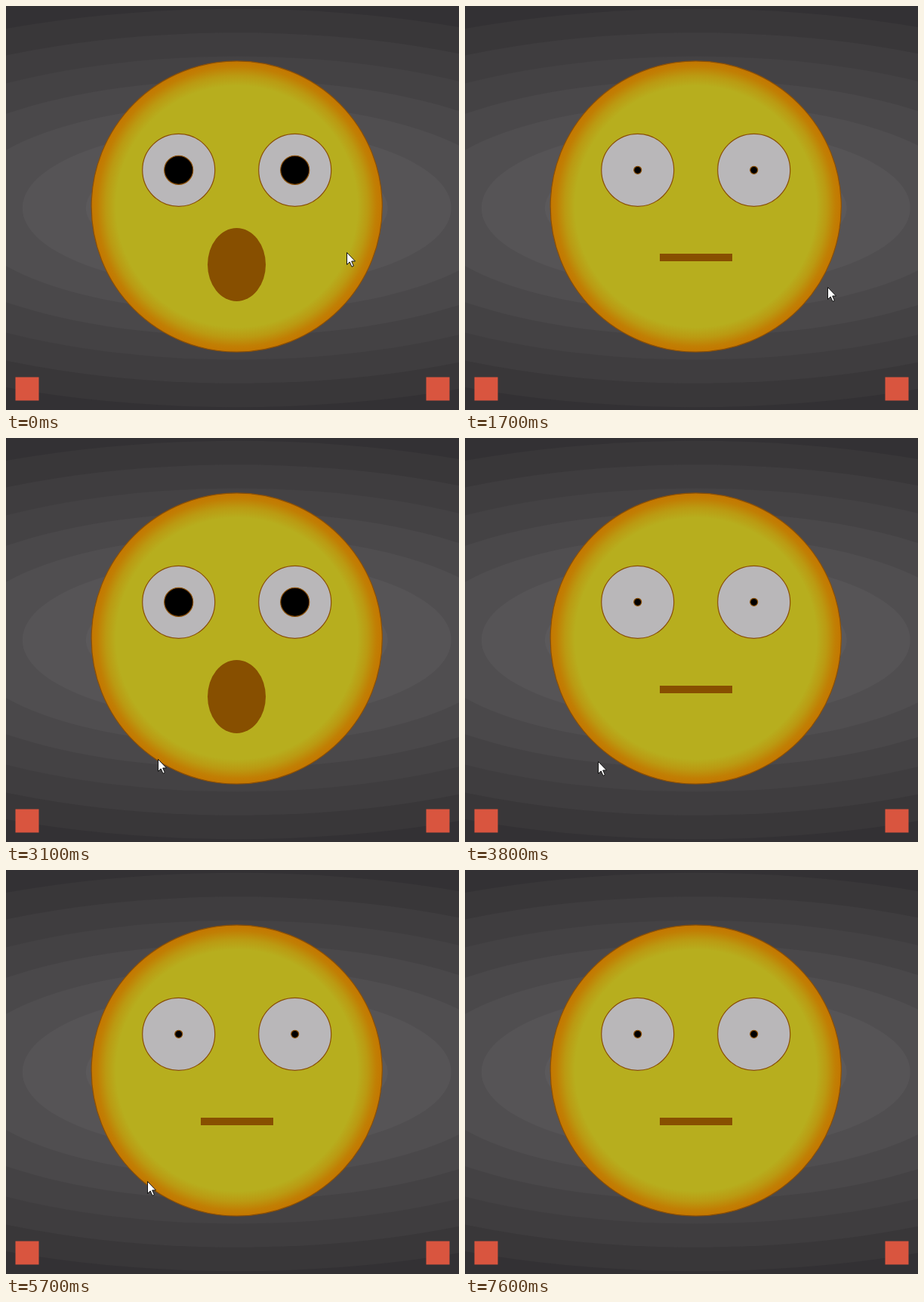
An HTML page for the animation above (8.1 s loop, 600x535 px).

```html
<!DOCTYPE html>
<html lang="en">
<head>
<meta charset="utf-8">
<title>Surprised face</title>
<style>
html, body { margin: 0; width: 100%; height: 100%; overflow: hidden; background: #333134; }
svg { display: block; width: 600px; height: 535px; }
.line { stroke: #8a4f06; stroke-width: 1.2; }
</style>
</head>
<body>
<svg viewBox="0 0 600 535">
  <defs>
    <radialGradient id="skin">
      <stop offset="0.83" stop-color="#b7ae1e"/>
      <stop offset="0.9" stop-color="#bb9a12"/>
      <stop offset="0.96" stop-color="#c17f04"/>
      <stop offset="1" stop-color="#c47600"/>
    </radialGradient>
  </defs>
  <g id="glow"></g>
  <g fill="#d9553f">
    <rect x="12.5" y="491.5" width="31" height="31"/>
    <rect x="556.5" y="491.5" width="31" height="31"/>
  </g>
  <circle class="line" cx="305.7" cy="265.5" r="192.6" fill="url(#skin)"/>
  <g id="eyes"></g>
  <rect id="mouth" fill="#874f00"/>
  <path id="cursor" d="M.5 .5V16.5L4.2 13L7 19.3L9.4 18.2L6.7 12H11.5Z" fill="#fff" stroke="#111"/>
</svg>
<script>
const $ = id => document.getElementById(id);
const LOOP = 8100, STEP = 100;
const CX = 305.7, CY = 265.5, REACH = 192;

function set(el, attrs) {
  for (const key in attrs) el.setAttribute(key, attrs[key]);
  return el;
}

function add(parent, tag, attrs) {
  const el = document.createElementNS("http://www.w3.org/2000/svg", tag);
  parent.append(set(el, attrs));
  return el;
}

// Banded grey backdrop, lightest in the middle
for (let i = 0; i < 7; i++) {
  const rx = 704 - 84 * i, v = Math.round(57 + 5.7 * i);
  add($("glow"), "ellipse", { cx: CX, cy: 267.5, rx, ry: rx / 2.67, fill: `rgb(${v},${v - 2},${v})` });
}

const pupils = [-1, 1].map(side => {
  const at = { class: "line", cx: CX + side * 77, cy: 217.3 };
  add($("eyes"), "circle", { ...at, r: 48, fill: "#b9b7b9" });
  return add($("eyes"), "circle", at);
});

// Where the pointer turns or rests: [step, x, y]
const path = [
  [0, 451, 326], [10, 503, 353], [17, 480, 372], [23, 392, 373],
  [27, 338, 401], [30, 338, 401], [31, 201, 425], [35, 160, 437],
  [38, 176, 428], [44, 242, 410], [47, 242, 410], [48, 199, 421],
  [54, 160, 428], [57, 187, 412], [63, 350, 405], [67, 448, 533], [68, 460, 560]
];

function pointer(step) {
  const i = path.findIndex(p => p[0] > step);
  if (i < 0) return path.at(-1).slice(1);
  const [s, x, y] = path[i - 1], [s2, x2, y2] = path[i];
  const k = (step - s) / (s2 - s);
  return [x + (x2 - x) * k, y + (y2 - y) * k].map(Math.round);
}

const openMouth = { x: 267, y: 294, width: 77, height: 97, rx: 38.5, ry: 48.5 };
const flatMouth = { x: 258, y: 328, width: 96, height: 10, rx: 0, ry: 0 };

// The face reacts one step after the pointer enters or leaves it
function draw(time) {
  const step = Math.floor(time % LOOP / STEP);
  const [px, py] = pointer(Math.max(0, step - 1));
  const shocked = Math.hypot(px - CX, py - CY) < REACH;
  pupils.forEach(el => set(el, { r: shocked ? 19 : 5 }));
  set($("mouth"), shocked ? openMouth : flatMouth);
  set($("cursor"), { transform: `translate(${pointer(step)})` });
}

let start;
function tick(now) {
  start ??= now;
  draw(now - start);
  requestAnimationFrame(tick);
}
draw(0);
requestAnimationFrame(tick);
</script>
</body>
</html>
```
